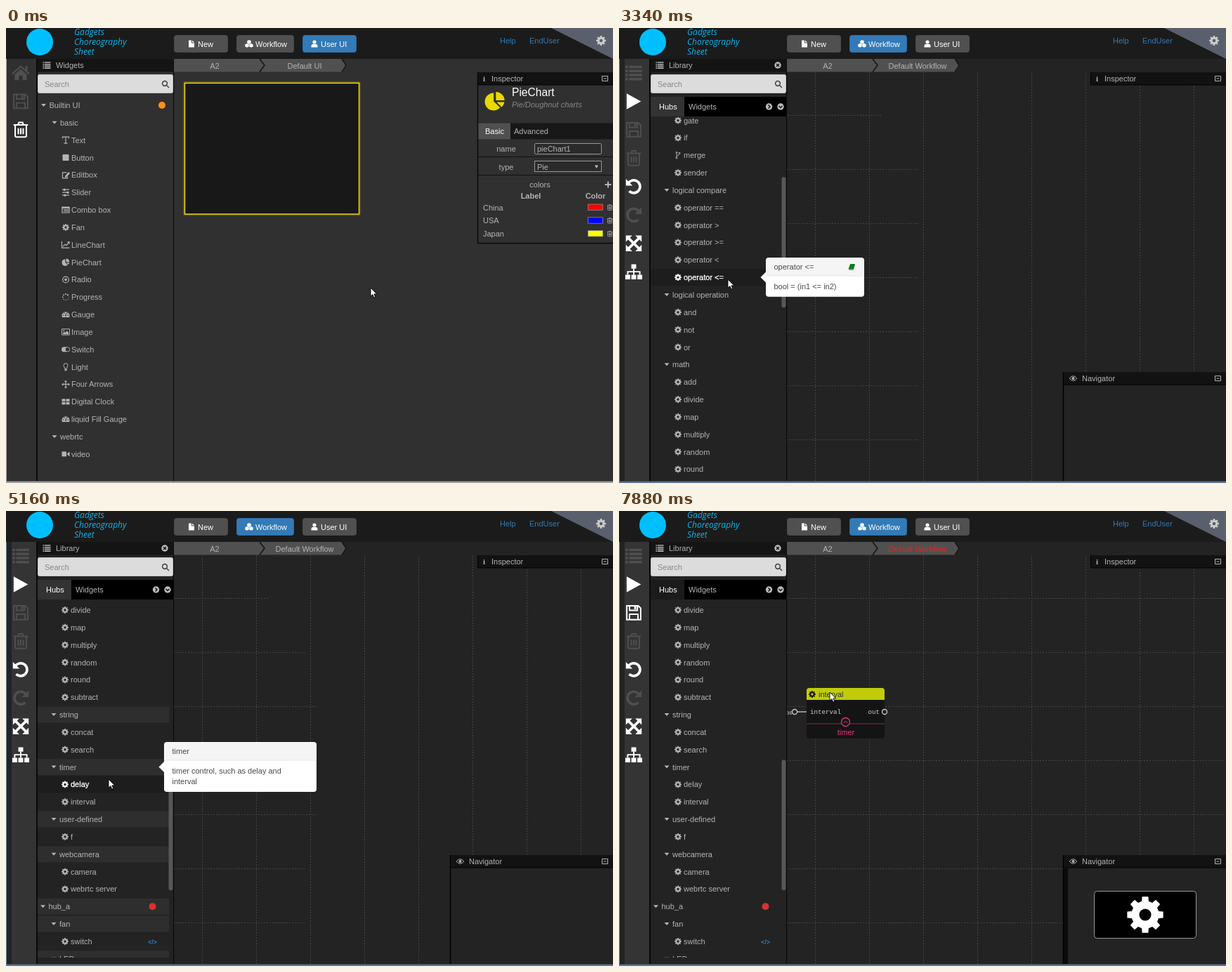
Write an HTML page that moves like this. It is 864 px wide and 648 px high and loops after 8 s.

```html
<!DOCTYPE html>
<html lang="en">
<head>
<meta charset="utf-8">
<title>Workflow editor</title>
<style>
html, body { margin: 0; width: 100%; height: 100%; overflow: hidden; background: #1b1b1b; }
svg { display: block; width: 864px; height: 648px; }
text { font: 11px "Liberation Sans", Arial, sans-serif; fill: #b4b4b4; white-space: pre; }
.mid { text-anchor: middle; }
.white { fill: #fff; }
.hot { fill: #fff; stroke: #fff; stroke-width: .3px; }
.bold { font-weight: bold; }
.ital { font-style: italic; }
.dim { fill: #888; }
.link { fill: #337ab7; }
.tip { fill: #4a4a4a; }
.mono { font: 9.2px "Liberation Mono", monospace; fill: #ccc; }
.brand { font: italic 12px "Open Sans", sans-serif; fill: #0ab4ee; }
</style>
</head>
<body>
<svg id="stage" viewBox="0 0 864 648"></svg>
<script>
const LOOP = 8000, ROW = 24.84;
const esc = s => s.replace(/&/g, '&amp;').replace(/</g, '&lt;').replace(/>/g, '&gt;');
const text = (x, y, s, cls = '', more = '') => `<text x="${x}" y="${y + 4}" class="${cls}" ${more}>${esc(s)}</text>`;
const rect = (x, y, w, h, fill, more = '') => `<rect x="${x}" y="${y}" width="${w}" height="${h}" fill="${fill}" ${more}/>`;
const path = (d, fill, more = '') => `<path d="${d}" fill="${fill}" ${more}/>`;
const line = (d, stroke, w = 1, more = '') => path(d, 'none', `stroke="${stroke}" stroke-width="${w}" ${more}`);
const ring = (x, y, r) => `M${x - r} ${y}a${r} ${r} 0 1 0 ${2 * r} 0a${r} ${r} 0 1 0 ${-2 * r} 0z`;
const range = n => [...Array(n).keys()];

function gearPath(r) {
  const pts = range(8).flatMap(i => [[-.25, .76], [-.17, 1], [.17, 1], [.25, .76]].map(([a, k]) => {
    const t = i * Math.PI / 4 + a;
    return (r * k * Math.sin(t)).toFixed(2) + ' ' + (-r * k * Math.cos(t)).toFixed(2);
  }));
  return 'M' + pts.join('L') + 'z' + ring(0, 0, r * .33);
}

const dots = range(8).map(i => ring(4.2 * Math.cos(i * .785), 4.2 * Math.sin(i * .785), .55 + i * .08)).join('');
const cube = (x, y) => `M${x} ${y - 3}l2.7 1.2v3.2l-2.7 1.4-2.7-1.4v-3.2z`;

// Each icon: filled path, stroked path, stroke width; about 11 units wide.
const icons = {
  gear: [gearPath(5)],
  text: ['', 'M-4.5-2.5V-4.5H4.5V-2.5M0-4.5V4.5M-2.5 4.5H2.5'],
  button: ['M-3.5-4.5h7q1 0 1 1v7q0 1-1 1h-7q-1 0-1-1v-7q0-1 1-1z'],
  edit: ['M-1 1.5 4-4.5 6-2.5 1 3-1 3.5z', 'M2.5 2V4.5H-4.5V-3.5H1.5'],
  slider: ['M-3-5.5h2.5v3h-2.5zM1.5-1.5h2.5v3h-2.5zM-2.5 2.5h2.5v3h-2.5z', 'M-5-4H5M-5 0H5M-5 4H5'],
  combo: ['M-5.5-4.5h11v2.5h-11z', 'M-5-4V4H5V-4M-3-.2H4M-3 2H4'],
  chart: ['', 'M-5.5-5V4.5H5.5M-4 2.5-1-.5 1 1 5-4M2.5-4H5V-1.5'],
  pie: ['M-.7-4.4A4.8 4.8 0 1 0 2.8 3.6L-.7 .2zM.5-5A5 5 0 0 1 5.3 -.4H.5zM.9 .6H5.2A5 5 0 0 1 3.7 3.4z'],
  radio: [ring(0, 0, 1.8), ring(0, 0, 4.3)],
  progress: [dots],
  gauge: ['M-5 4A5.5 5.5 0 1 1 5 4z' + ring(-3.2, 1, .8) + ring(-2, -2, .8) + ring(2, -2, .8) + ring(3.2, 1, .8) + 'M.4-2.5 1 2.5H-1z'],
  image: ['M-4 3V1.5L-2-.5-.5 1 2-2 4 1V3z' + ring(-2.7, -1.8, 1), 'M-5.5-4.2h11v8.4h-11z', 1],
  toggle: ['M-2.5-3.5H2.5A3.5 3.5 0 0 1 2.5 3.5H-2.5A3.5 3.5 0 0 1-2.5-3.5z' + ring(2.5, 0, 2.7)],
  bulb: ['M-1.5 3h3v2.5h-3z', 'M-1.3 2.5C-1.3 1-3-.2-3-2A3 3 0 0 1 3-2C3-.2 1.3 1 1.3 2.5z', 1],
  arrows: ['M0-6 2-3.5H-2zM0 6 2 3.5H-2zM-6 0-3.5-2V2zM6 0 3.5-2V2z', 'M0-4V4M-4 0H4'],
  grid: ['M-5.5-4h5v3.5h-5zM.5-4h5v3.5h-5zM-5.5.5h5v3.5h-5zM.5.5h5v3.5h-5z'],
  video: ['M-5.5-3.5H1V3.5H-5.5zM2-.5 5.5-3.5V3.5L2 .5z'],
  branch: ['', ring(-2, -3.8, 1) + ring(-2, 3.8, 1) + ring(2, -3, 1) + 'M-2-2.5V2.5M2-1.8C2 0-2 .5-2 2', 1],
  search: ['', ring(-1, -1, 3.4) + 'M1.5 1.5 5 5', 1.5],
  list: ['', [-4, -1.3, 1.4, 4.1].map(y => `M-5.5 ${y}h1.7M-3 ${y}H5.5`).join(''), 1.6],
  home: ['M0-5 6 .3 5.3 1 0-3.6-5.3 1-6 .3zM-4 1 0-2.6 4 1V4.8H1.2V1.8H-1.2V4.8H-4zM3-4.5h1.5V-1L3-2.4z'],
  save: ['M.3-4.3h1.3v2h-1.3z', 'M-4.6-4.6H3L4.6-3V4.6H-4.6zM-2.8-4.6V-1.6H2.4V-4.6M-2.8 4.6V1H2.8V4.6', .9],
  trash: ['', 'M-3.7-3V4Q-3.7 4.8-2.7 4.8H2.7Q3.7 4.8 3.7 4V-3M-4.8-3.2H4.8M-1.8-3.4-1.2-4.8H1.2L1.8-3.4M-1.6-1V3M0-1V3M1.6-1V3', .95],
  undo: ['M-5.2-5V-.6H-.8z', 'M-3.6-2.2A4.2 4.2 0 1 1-3 3', 1.7],
  redo: ['M5.2-5V-.6H.8z', 'M3.6-2.2A4.2 4.2 0 1 0 3 3', 1.7],
  expand: ['M-5.2-5.2H-1L-5.2-1zM5.2-5.2V-1L1-5.2zM-5.2 5.2V1L-1 5.2zM5.2 5.2H1L5.2 1z', 'M-4-4 4 4M4-4-4 4', 1.7],
  sitemap: ['M-1.6-5h3.2v3h-3.2zM-5.6 2h3.2v3h-3.2zM-1.6 2h3.2v3h-3.2zM2.4 2h3.2v3h-3.2z', 'M-4 2V0H4V2M0-2V2', .9],
  play: ['M-4.7-5.2 4.8 0-4.7 5.2z'],
  file: ['M-4-5H0V-1H4V5H-4zM1-5 4-2H1z'],
  cubes: [cube(0, -2.4) + cube(-3, 2.5) + cube(3, 2.5)],
  user: [ring(0, -2.5, 2.6) + 'M-4.5 5V3Q-4.5.6-2 .6H2Q4.5.6 4.5 3V5z'],
  eye: [ring(0, 0, 2.1), 'M-5.4 0Q0-6.6 5.4 0 0 6.6-5.4 0z', 1],
  fold: ['', 'M-4-3.5H4V3.5H-4zM-2 0H2', 1],
  book: ['M-2-4.5H5.2L3 4H-5z', 'M-4 4.5H2.6L5-3M-.6-2.4H3', 1]
};

function icon(name, x, y, k = 1, color = '#b4b4b4') {
  const [fill, stroke, w = 1.2] = icons[name];
  return `<g transform="translate(${x} ${y}) scale(${k})">` +
    (fill ? path(fill, color, 'fill-rule="evenodd"') : '') + (stroke ? line(stroke, color, w) : '') + '</g>';
}

const badge = (x, y, d) => `<circle cx="${x}" cy="${y}" r="4.7" fill="#bbb"/>` +
  line(d, '#111', 1.5, `transform="translate(${x} ${y})"`);
const dot = (x, y, c) => `<circle cx="${x}" cy="${y}" r="5" fill="${c}"/>`;

// '#' marks a root, '-' a group; other entries are items, optionally "icon@label".
const widgets = ('#Builtin UI,-basic,text@Text,button@Button,edit@Editbox,slider@Slider,combo@Combo box,gear@Fan,' +
  'chart@LineChart,pie@PieChart,radio@Radio,progress@Progress,gauge@Gauge,image@Image,toggle@Switch,bulb@Light,' +
  'arrows@Four Arrows,grid@Digital Clock,gauge@liquid Fill Gauge,-webrtc,video@video').split(',');
const hubs = ('#** Builtin **,-email,sendmail,-talvo,posttalvo,-counter,count,countdown,-flow control,gate,if,' +
  'branch@merge,sender,-logical compare,operator ==,operator >,operator >=,operator <,operator <=,' +
  '-logical operation,and,not,or,-math,add,divide,map,multiply,random,round,subtract,-string,concat,search,' +
  '-timer,delay,interval,-user-defined,f,-webcamera,camera,webrtc server,#hub_a,-fan,switch,-LED').split(',');

function tree(rows, x, top, s = {}) {
  return rows.map((entry, i) => {
    const y = +(top + i * ROW).toFixed(1);
    if (y < 100 || y > 660) return '';
    const depth = '#-'.indexOf(entry[0]);
    const [glyph, name] = depth >= 0 ? ['', entry.slice(1)] : entry.includes('@') ? entry.split('@') : ['gear', entry];
    const hot = s.hot === name, color = hot ? '#fff' : '#b4b4b4', cls = hot ? 'hot' : '';
    if (depth < 0)
      return (hot ? rect(45, y - 12, 187, 24, '#1d1d1d') : '') +
        icon(glyph, x + 31.5, y, 1, color) + text(x + 39.5, y, name, cls) +
        (name === 'switch' ? text(202, y, '</>', 'link bold', 'style="font-size:9px"') : '');
    const cx = x + depth * 15.5;
    return (s.bands ? rect(45, y - 11.5, 187, 23, hot ? '#363636' : '#2e2e2e') : '') +
      path(`M${cx - 3.5} ${y - 2}h7l-3.5 4z`, color) + text(cx + 8, y, name, cls);
  }).join('');
}

const tips = {
  le: [209, 327, 140, 'operator <=', ['bool = (in1 <= in2)'], 1],
  string: [225, 340, 139, 'string', ['functuons for strings']],
  timer: [225, 329, 217, 'timer', ['timer control, such as delay and', 'interval']],
  delay: [209, 346, 218, 'delay', ['hold the input signal for a given', 'time, and then send it to the', 'output'], 1],
  interval: [209, 386, 145, 'interval', ['send signal 1 at intervals'], 1]
};

function tooltip(name, alpha) {
  const [x, y, w, title, lines, book] = tips[name];
  const h = 40.5 + lines.length * 15.3, mid = y + h / 2;
  return `<g opacity="${alpha}">` + rect(x, y, w, h, '#fff', 'rx="4"') + path(`M${x + .5} ${mid - 8}l-8 8 8 8z`, '#fff') +
    rect(x + 1, y + 1, w - 2, 25, '#f5f5f5', 'rx="3"') + line(`M${x} ${y + 26}h${w}`, '#e8e8e8') +
    text(x + 11.5, y + 12.5, title, 'tip') + (book ? icon('book', x + w - 18, y + 13, .9, '#0a7d1c') : '') +
    lines.map((t, i) => text(x + 11.5, y + 40.5 + i * 15.5, t, 'tip')).join('') + '</g>';
}

function button(x, w, glyph, label, on) {
  const tx = { New: 273, Workflow: 355, 'User UI': 448 }[label];
  return rect(x + .5, 10.5, w - 1, 24, on ? '#337ab7' : '#505050', `rx="3" stroke="${on ? '#2e6da4' : '#4a4a4a'}"`) +
    icon(glyph, tx - 9, 22.5, 1, '#fff') + text(tx, 22.5, label, 'white');
}

const header = s => rect(0, 0, 864, 44, '#1b1b1b') + '<circle cx="48" cy="20" r="19" fill="#00bfff"/>' +
  ['Gadgets', 'Choreography', 'Sheet'].map((t, i) => text(97, 6 + i * 14, t, 'brand')).join('') +
  button(239, 77, 'file', 'New') + button(328, 82, 'cubes', 'Workflow', s.flow) + button(422, 77, 'user', 'User UI', !s.flow) +
  text(703, 18, 'Help', 'link') + text(745, 18, 'EndUser', 'link') +
  path('M776 0H864V44z', '#5a5f6d') + icon('gear', 847, 18, 1.4, '#ccc');

const crumbs = s => path('M239 44H478L484 53 478 62.5H239z', '#505050') +
  line('M361 44 368 53 361 62.5', '#151515', 1.6) + line('M478 44 484 53 478 62.5', '#151515', 1.4) +
  text(297, 53.5, 'A2', 'mid') +
  text(425, 53.5, s.flow ? 'Default Workflow' : 'Default UI', s.dirty ? 'mid ital' : 'mid', s.dirty ? 'style="fill:#f02020"' : '');

const sidebar = title => rect(43, 44, 2, 601, '#0a0a0a') + rect(238, 44, 1.2, 601, '#0a0a0a') +
  rect(45, 44, 193, 18.5, '#141414') + icon('list', 58, 53, 1) + text(71, 53, title) +
  rect(45.5, 66.5, 192, 26, '#dcdcdc', 'rx="2" stroke="#c4c4c4"') + text(55, 79.5, 'Search', 'dim') + icon('search', 227, 80, 1, '#444');

const titleBar = (x, y, label, tx = x + 20) => rect(x, y, 864 - x, 18, '#121212') + line(`M${x + .5} ${y}V${y + 18}H864`, '#000') +
  text(tx, y + 9, label) + icon('fold', 852.5, y + 9);
const inspectorBar = () => titleBar(671, 63, 'Inspector') + text(679, 72, 'i', 'bold', 'style="font-family:Liberation Serif,serif"');

function inspector() {
  const entries = [['China', '#f00'], ['USA', '#00f'], ['Japan', '#ff0']];
  return rect(671, 63, 193, 244, '#303030') + inspectorBar() +
    icon('pie', 696, 104, 2.6, '#e8d800') + text(720, 93, 'PieChart', 'white', 'style="font-size:15.6px"') +
    text(720, 109, 'Pie/Doughnut charts', 'dim ital') +
    rect(672, 135.5, 192, 23, '#181818') + rect(672, 135.5, 46, 23, '#505050') +
    text(682, 147, 'Basic', 'white') + text(723, 147, 'Advanced') +
    text(712, 172, 'name', 'mid') + rect(752.5, 164.5, 95, 15, '#2a2a2a', 'stroke="#999" rx="2"') + text(756, 172, 'pieChart1') +
    text(712, 197.5, 'type', 'mid') + rect(752.5, 189.5, 95, 15, '#2a2a2a', 'stroke="#999"') + text(756, 197.5, 'Pie') +
    path('M838 195.5h5l-2.5 4.5z', '#bbb') + line('M672 183.5H864M672 209.5H864', '#111') +
    text(760, 223, 'colors', 'mid') + line('M852.5 223h9M857 218.5v9', '#b4b4b4', 2) +
    text(747, 238.5, 'Label', 'mid bold') + text(839, 238.5, 'Color', 'mid bold') +
    entries.map(([name, c], i) => {
      const y = 255.5 + i * 18.7;
      return text(679, y, name) + rect(828.5, y - 4.5, 21, 8.5, c, 'stroke="#888" stroke-width=".8"') + icon('trash', 859.5, y, .8);
    }).join('') + line('M671.5 63V306.5H864', '#0a0a0a', 1.5);
}

const tools = list => list.map(([name, on], i) => icon(name, 21, 64 + i * 40.45, 2.15, on ? '#fff' : '#4f4f4f')).join('');

const designView = () => rect(0, 44, 864, 604, '#303030') + sidebar('Widgets') +
  tree(widgets, 53.5, 110) + dot(222, 110, '#ff9020') + tools([['home'], ['save'], ['trash', 1]]) +
  rect(254, 78, 249, 187, 'none', 'stroke="#c07820" stroke-width="4" opacity=".4" rx="1"') +
  rect(254.5, 78.5, 248, 186.5, '#181818', 'stroke="#f4f000" stroke-width="1.3"') + inspector() +
  rect(0, 44, 1, 604, '#aaa') + rect(0, 645.5, 864, 2.5, '#a0a0a0');

function gridLines(level) {
  const right = y => level > 2 ? 864 : y < 130 ? 373 : level > 1 && y > 270 && y < 440 ? 442 : 427;
  const cols = range(8).map(i => `M${280 + 77 * i - .5} 63V645`).join('');
  const rows = level ? range(7).map(i => 125 + 77 * i).map(y => `M239 ${y - .5}H${right(y)}`).join('') : '';
  return line(cols + rows, '#454545', 1, 'stroke-dasharray="2 2"');
}

const port = (x, y) => `<circle cx="${x}" cy="${y}" r="3.5" fill="#222" stroke="#ccc" stroke-width="1.3"/>`;
const node = () => '<g>' + path('M267 269V256q0-4 4-4H374q4 0 4 4V269z', '#c0cc0a') +
  path('M267 269H378V320q0 4-4 4H271q-4 0-4-4z', '#141414') +
  icon('gear', 275, 261, 1, '#181818') + text(284, 261, 'interval', '', 'style="fill:#333"') +
  line('M254 286H267', '#ccc', 1.3) + port(250, 286) + port(378, 286) +
  text(247, 286, '00', 'mono bold', 'text-anchor="end" style="font-size:8px"') +
  text(272, 285, 'interval', 'mono') + text(354.5, 285, 'out', 'mono') + line('M267 303H378', '#8c2850') +
  '<circle cx="322.5" cy="300.5" r="6" fill="#141414" stroke="#e8327c" stroke-width="1.3"/>' +
  line('M319.5 302l3-3 3 3', '#e8327c') + text(323, 315, 'timer', 'mid', 'style="fill:#e8327c"') + '</g>';

const navigator = s => rect(632, 490, 232, 155, '#232323') + line('M632.5 490V645', '#000', 1.5) +
  titleBar(632, 490, 'Navigator', 659) + icon('eye', 646.5, 499) +
  (s.dirty ? rect(633, 509, 6, 136, '#0a0a0a') + rect(676.5, 541.5, 145, 67, '#000', 'stroke="#999" rx="4"') +
    icon('gear', 749, 575, 5.2, '#fff') : '');

function flowView(s) {
  const bar = 127 + s.scroll * .366;
  return rect(0, 44, 864, 604, '#232323') + rect(8, 44, 35, 601, '#343434') + gridLines(s.grid) +
    (s.node ? node() : '') + rect(45, 62, 193, 583, '#232323') + sidebar('Library') +
    badge(226, 53, 'M-2-2 2 2M2-2-2 2') + rect(45, 98, 193, 28, '#000') + rect(45, 98, 48, 28, s.lit ? '#333' : '#1b1b1b') +
    text(57, 112, 'Hubs', 'white') + text(99, 112, 'Widgets') +
    badge(213.5, 112, 'M-1-2.5 1.5 0-1 2.5') + badge(230, 112, 'M-2.5-1 0 1.5 2.5-1') +
    (s.list ? '<g clip-path="url(#listArea)">' + tree(hubs, 52.5, 141 - s.scroll, s) +
      dot(208.5, 141 - s.scroll, '#e8327c') + dot(208.5, 141 + 42 * ROW - s.scroll, '#dc3030') + '</g>' +
      rect(231.5, bar, 6, 186, '#575757', 'rx="3"') : '') +
    tools([['list'], ['play', 1], ['save', s.dirty], ['trash'], ['undo', 1], ['redo'], ['expand', 1], ['sitemap', 1]]) +
    inspectorBar() + navigator(s) +
    rect(0, 44, 1, 604, '#6f86a3') + rect(0, 645.5, 864, 2.5, '#5a7494');
}

function ghost([x, y]) {
  return rect(x + .5, y + .5, 110, 50, '#232323', 'stroke="#a0a0a0" rx="4"') + text(x + 56, y + 9, 'interval', 'mid');
}

function cursor([x, y], hand) {
  const d = hand
    ? 'M-1.5 0Q0-1 1.5 0V5L7 6.5Q8.5 7 8.2 9L7 15H-.5L-4 9.5Q-4 7.5-1.5 9z'
    : 'M0 0V12.2L2.9 9.6 4.8 14 6.8 13.1 4.9 8.9H8.8z';
  return path(d, '#fff', `stroke="#000" stroke-width=".9" transform="translate(${x} ${y})"`);
}

// Changes in order of time; each one is laid over the state before it.
const steps = [
  [0, { at: [519, 370], scroll: 0, grid: 0 }],
  [520, { at: [508, 342] }],
  [655, { at: [472, 252] }],
  [790, { at: [425, 140] }],
  [925, { at: [390, 62] }],
  [1060, { at: [375, 22], hand: 1 }],
  [1340, { flow: 1 }],
  [1510, { list: 1 }],
  [2610, { at: [365, 35] }],
  [2770, { at: [262, 150], hand: 0 }],
  [2910, { at: [180, 296], hot: 'if', grid: 1, lit: 1 }],
  [3050, { at: [157, 350], hot: '' }],
  [3200, { at: [155, 358], scroll: 116 }],
  [3340, { scroll: 233, hot: 'operator <=', tip: 'le', alpha: 1 }],
  [4170, { tip: '' }],
  [4480, { at: [157, 366], scroll: 388, hot: '', bands: 1 }],
  [4600, { scroll: 543, hot: 'string' }],
  [4720, { scroll: 621, tip: 'string' }],
  [4860, { hot: 'timer', tip: '' }],
  [5000, { tip: 'timer', grid: 2 }],
  [5140, { at: [146, 382], hot: 'delay' }],
  [5290, { at: [138, 390], tip: 'delay' }],
  [5560, { at: [126, 413], hot: 'interval', tip: '' }],
  [5700, { tip: 'interval', alpha: .22 }],
  [5820, { alpha: 1 }],
  [6250, { ghost: [133, 412], at: [126, 418], hot: '', tip: '' }],
  [6390, { ghost: [166, 362], at: [159, 368] }],
  [6520, { ghost: [214, 300], at: [207, 306], tip: 'timer' }],
  [6650, { ghost: [252, 248], at: [245, 254] }],
  [6790, { ghost: [277, 226], at: [269, 231] }],
  [6940, { ghost: [270, 229], at: [266, 234] }],
  [7190, { ghost: [267, 232], at: [267, 238], tip: '' }],
  [7310, { ghost: [267, 251], at: [273, 257] }],
  [7580, { ghost: null, node: 1, at: [300, 258], bands: 0, lit: 0, grid: 3 }],
  [7730, { dirty: 1 }]
];

const stage = document.getElementById('stage');
const defs = '<defs><clipPath id="listArea"><rect x="45" y="127" width="193" height="509"/></clipPath></defs>';
let shown = -1;

function draw(time) {
  const past = steps.filter(([t]) => t <= time);
  if (past.length === shown) return;
  shown = past.length;
  const s = Object.assign({}, ...past.map(step => step[1]));
  stage.innerHTML = defs + header(s) + (s.flow ? flowView(s) : designView()) + crumbs(s) +
    (s.tip ? tooltip(s.tip, s.alpha) : '') + (s.ghost ? ghost(s.ghost) : '') + cursor(s.at, s.hand);
}

const start = performance.now();
function tick() {
  draw((performance.now() - start) % LOOP);
  requestAnimationFrame(tick);
}
tick();
</script>
</body>
</html>
```
